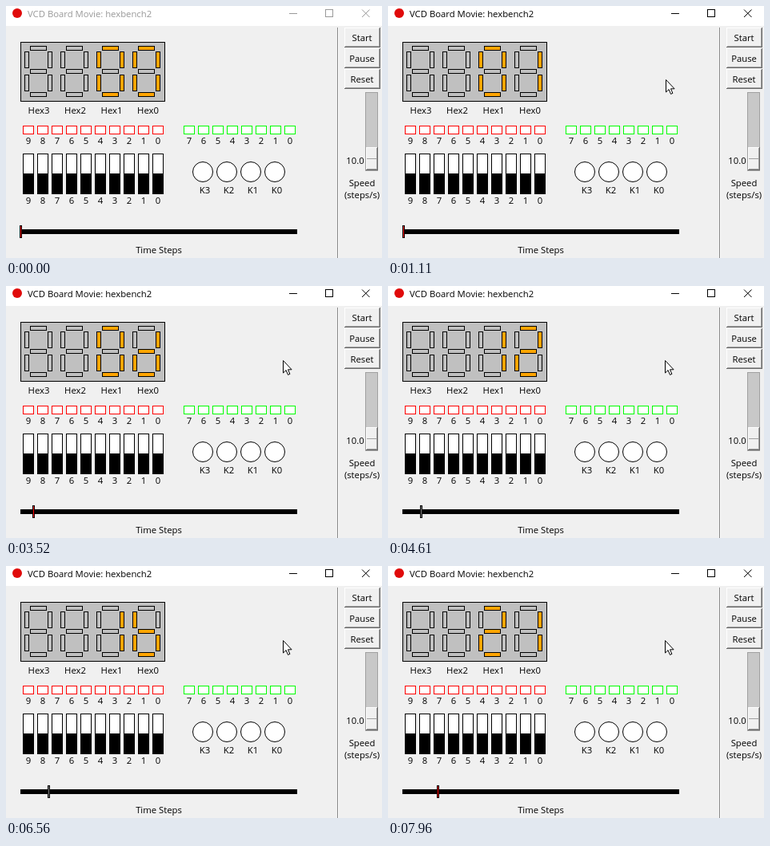
An HTML page that plays this animation: 470x316 px, repeating every 8 s.

```html
<!DOCTYPE html>
<html lang="en">
<head>
<meta charset="utf-8">
<title>VCD Board Movie</title>
<style>
  html, body { margin: 0; width: 100%; height: 100%; overflow: hidden; background: #f0f0f0; }
  svg { display: block; width: 470px; height: 316px; }
  text { font: 11.3px "Open Sans", "Noto Sans", sans-serif; fill: #000; }
  .mid { text-anchor: middle; }
  .crisp { shape-rendering: crispEdges; }
  #caption { --ink: #999; }
  #caption.active { --ink: #000; }
  #caption text { fill: var(--ink); }
  #caption path { fill: none; stroke: var(--ink); }
</style>
</head>
<body>
<svg id="stage" viewBox="0 0 470 316">
  <rect width="470" height="316" fill="#f0f0f0"/>
  <rect width="470" height="25" fill="#fff"/>
  <circle cx="14" cy="9" r="6" fill="#e00b0b"/>
  <g id="caption">
    <text x="27" y="13.5">VCD Board Movie: hexbench2</text>
    <path class="crisp" d="M354 9.5h10M399.5 4.5h9v9h-9z"/>
    <path d="M445 4.5l9.5 9.5m0-9.5l-9.5 9.5"/>
  </g>
  <path class="crisp" d="M414.5 27v289" stroke="#888"/>
  <path class="crisp" d="M415.5 27v289" stroke="#fff"/>
  <g id="board"></g>
  <rect class="crisp" x="18" y="280" width="346" height="6"/>
  <rect id="marker" class="crisp" x="17.5" y="275.5" width="2" height="15" stroke="#000"/>
  <path id="cursor" d="M.5 .5v15.5l3.6-3.4 2.4 5.8 2.4-1-2.4-5.6h4.6z" fill="#fff" stroke="#000"/>
</svg>
<script>
const $ = id => document.getElementById(id);
const board = $('board');

function add(tag, attrs, parent = board) {
  const el = document.createElementNS('http://www.w3.org/2000/svg', tag);
  for (const key in attrs) el.setAttribute(key, attrs[key]);
  parent.append(el);
  return el;
}
const box = (x, y, width, height, fill, stroke = '#000') =>
  add('rect', { x: x + .5, y: y + .5, width, height, fill, stroke, class: 'crisp' });
function label(x, y, str, parent) {
  add('text', { x, y, class: 'mid' }, parent).textContent = str;
}

// Classic raised frame: light top and left, dark bottom and right
function bevel(x, y, w, h, parent) {
  const g = add('g', { class: 'crisp' }, parent);
  add('rect', { x, y, width: w, height: h, fill: '#f0f0f0' }, g);
  const line = (d, stroke) => add('path', { d, stroke, fill: 'none' }, g);
  const light = line(`M${x + .5} ${y + h - 1}V${y + .5}H${x + w - 1}`, '#fff');
  line(`M${x + 1} ${y + h - 1.5}H${x + w - 1.5}V${y + 1}`, '#a0a0a0');
  const dark = line(`M${x} ${y + h - .5}H${x + w - .5}V${y}`, '#696969');
  return { light, dark };
}

// Seven-segment digits, segments in order a to g
const SEGMENTS = [
  [7, 50, 20, 5], [29, 57, 5, 20], [29, 86, 5, 20], [7, 108, 20, 5],
  [0, 86, 5, 20], [0, 57, 5, 20], [7, 79, 20, 5]
];
const GLYPHS = ['abcdef', 'bc', 'abdeg', 'abcdg', 'bcfg', 'acdfg', 'acdefg', 'abc',
  'abcdefg', 'abcdfg', 'abcefg', 'cdefg', 'adef', 'bcdeg', 'adefg', 'aefg'];
const OFF = '#c0c0c0', ON = '#ffa500';

box(18, 45, 180, 74, OFF);
const digits = [0, 1, 2, 3].map(i => {
  label(41 + 45.5 * i, 135, 'Hex' + (3 - i));
  return SEGMENTS.map(([x, y, w, h]) => box(23 + 45 * i + x, y, w, h, OFF));
});
function show(segments, value) {
  segments.forEach((seg, i) =>
    seg.setAttribute('fill', GLYPHS[value].includes('abcdefg'[i]) ? ON : OFF));
}

function leds(x, count, color) {
  for (let i = 0; i < count; i++) {
    box(x + 18 * i, 150, 13, 10, '#fff', color);
    label(x + 7 + 18 * i, 173, count - 1 - i);
  }
}
leds(21, 10, '#f00');
leds(222, 8, '#0f0');

for (let i = 0; i < 10; i++) {
  const x = 21 + 18 * i;
  box(x, 185, 13, 50, '#fff');
  box(x, 210, 13, 25, '#000');
  label(x + 7, 248, 9 - i);
}
for (let i = 0; i < 4; i++) {
  add('circle', { cx: 246 + 30 * i, cy: 208, r: 12.5, fill: '#fff', stroke: '#000' });
  label(248.5 + 30 * i, 235, 'K' + (3 - i));
}
label(191, 310, 'Time Steps');

// Control panel
const [start] = ['Start', 'Pause', 'Reset'].map((name, i) => {
  const y = 27 + 26 * i;
  const edges = bevel(423, y, 45, 25);
  const face = add('g', {});
  label(445, y + 17, name, face);
  return { ...edges, face };
});
box(449, 108, 15, 98, '#c8c8c8', '#a0a0a0');
bevel(450, 177, 15, 29);
add('path', { d: 'M451 191.5h13', stroke: '#a0a0a0', class: 'crisp' });
label(436.5, 198, '10.0');
label(445, 226, 'Speed');
label(445, 241, '(steps/s)');

const LOOP = 8000;
const between = (t, a, b) => Math.min(1, Math.max(0, (t - a) / (b - a)));
const smooth = k => k * k * (3 - 2 * k);

function pointer(t) {
  const rise = smooth(between(t, 0, 620));
  const leave = smooth(between(t, 880, 1130));
  return [
    Math.round(425 + 12 * rise - 91 * leave),
    Math.round(316 - 279 * rise + 56 * leave)
  ];
}

function draw(t) {
  const step = t < 905 ? 0 : 1 + Math.floor((t - 905) / 108.4);
  const count = Math.ceil(step / 2);
  const high = count >> 4;
  show(digits[2], high);
  show(digits[3], count & 15);

  $('marker').setAttribute('x', 17.5 + Math.floor(step * .67 + .23));
  $('marker').setAttribute('fill', high === 1 ? '#808080' : '#f00');

  $('caption').classList.toggle('active', t >= 680);
  const pressed = t >= 680 && t < 780;
  start.light.setAttribute('stroke', pressed ? '#696969' : '#fff');
  start.dark.setAttribute('stroke', pressed ? '#fff' : '#696969');
  start.face.setAttribute('transform', pressed ? 'translate(1 1)' : '');

  $('cursor').setAttribute('visibility', t < 30 ? 'hidden' : 'visible');
  $('cursor').setAttribute('transform', `translate(${pointer(t)})`);
}

function tick() {
  draw(performance.now() % LOOP);
  requestAnimationFrame(tick);
}
tick();
</script>
</body>
</html>
```
